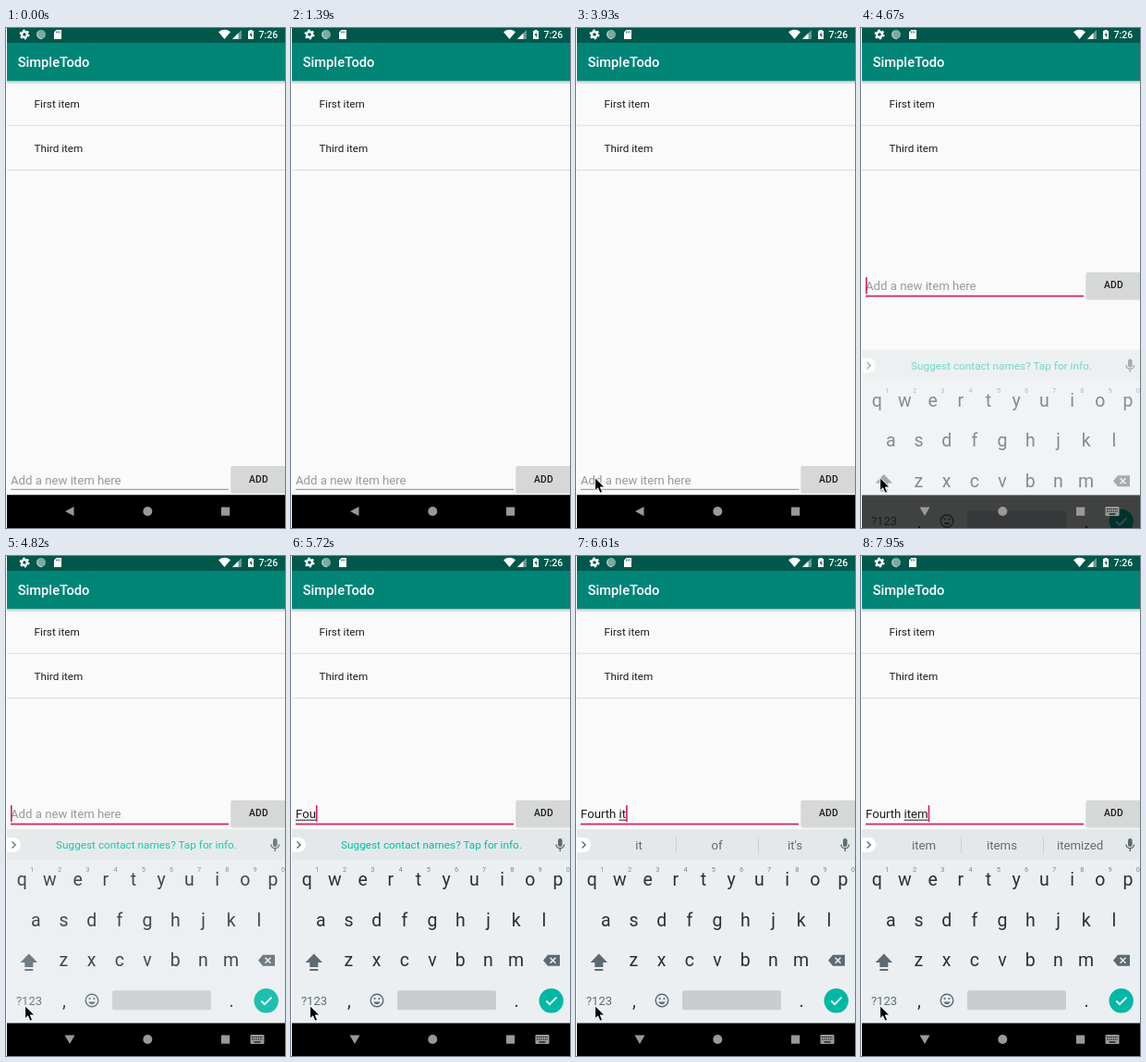
An HTML page that plays this animation: 302x540 px, repeating every 8 s.

```html
<!DOCTYPE html>
<html lang="en">
<head>
<meta charset="utf-8">
<title>Todo app</title>
<style>
  html, body { margin: 0; width: 100%; height: 100%; overflow: hidden; background: #fff; }
  svg { display: block; width: 100vw; height: 100vh; }
  text { font-family: Roboto, sans-serif; white-space: pre; }
  .mid { text-anchor: middle; }
  .key { font-size: 19.5px; fill: #263238; }
  .digit { font-size: 7.5px; fill: #78868d; }
  .word { font-size: 13.2px; fill: #5f6d74; }
  .field { font-size: 13.2px; }
  .icon { fill: #5c6b73; }
  .line { fill: none; stroke: #5c6b73; stroke-width: 1.4; }
</style>
</head>
<body>
<svg viewBox="0 0 302 540">
  <defs>
    <linearGradient id="shadow" x2="0" y2="1">
      <stop stop-color="#000" stop-opacity=".24"/>
      <stop offset="1" stop-color="#000" stop-opacity="0"/>
    </linearGradient>
  </defs>
  <rect x="1" width="301" height="540" fill="#fafafa"/>

  <!-- list and bars -->
  <rect x="1" y="57" width="301" height="4" fill="url(#shadow)"/>
  <rect x="1" width="301" height="57" fill="#008577"/>
  <rect x="1" width="301" height="16" fill="#00574b"/>
  <text x="12.7" y="42.3" font-size="14.7" font-weight="500" fill="#fff">SimpleTodo</text>
  <g font-size="11.7" fill="#1c1c1c">
    <text x="30.6" y="85.6">First item</text>
    <text x="30.6" y="133.8">Third item</text>
  </g>
  <path d="M1 105.2H302M1 153.5H302" stroke="#dadada"/>

  <!-- status icons -->
  <g fill="#fff">
    <circle cx="20" cy="7" r="3" fill="none" stroke="#fff" stroke-width="2.4"/>
    <circle cx="20" cy="7" r="4.7" fill="none" stroke="#fff" stroke-width="1.6" stroke-dasharray="2.4 2.52"/>
    <circle cx="38" cy="7" r="5" fill="#7fa8a1"/>
    <path d="M35 3.6A5 5 0 0 0 39 11.8" fill="none" stroke="#c3d6d2"/>
    <path d="M54.5 2H60V12H52V4.6Z"/>
    <path d="M54.5 3.5V5.5M56.3 3.5V5.5M58.1 3.5V5.5" stroke="#00574b" stroke-width=".8"/>
    <path d="M230 4.2Q236.5 -.6 243 4.2L236.5 12Z"/>
    <path d="M255 2V12H245Z" opacity=".4"/>
    <path d="M251.5 5.5V12H245Z"/>
    <path d="M263.5 2H266.500V3H268V12H262V3H263.500Z"/>
    <path d="M265.600 4.500L263.600 8H265V10.500L266.700 7H265.600Z" fill="#00574b"/>
    <text x="273.500" y="11" font-size="10.600" font-weight="500">7:26</text>
  </g>

  <!-- entry row -->
  <g id="row">
    <text id="entry" class="field" x="5" y="492.600"></text>
    <rect id="mark" y="494" height="1" fill="#222"/>
    <rect id="rule" x="5" width="236"/>
    <rect id="caret" y="478.500" width="1.600" height="18" fill="#d81b60"/>
    <rect x="243.500" y="474.500" width="60" height="28.500" rx="2" fill="#000" opacity=".13"/>
    <rect x="243.500" y="473" width="60" height="28.300" rx="1.500" fill="#d6d7d7"/>
    <text class="mid" x="273.500" y="490.800" font-size="10.300" font-weight="500" letter-spacing=".2" fill="#1c1c1c">ADD</text>
  </g>

  <rect x="1" y="504.500" width="301" height="36" fill="#000"/>

  <!-- keyboard -->
  <g id="board">
    <rect x="1" y="295" width="301" height="210" fill="#eceff1"/>
    <rect x="1" y="295" width="301" height="33" fill="#e4e8ea"/>
    <path d="M1 304H8A8 8 0 0 1 8 320H1Z" fill="#fff"/>
    <path d="M6.500 308.500L10.200 312L6.500 315.500" class="line"/>
    <rect class="icon" x="289" y="305" width="4.600" height="9" rx="2.300"/>
    <path class="line" stroke-width="1.200" d="M287 311.500A4.300 4.300 0 0 0 295.600 311.500M291.300 316V319"/>
    <text id="notice" x="54" y="316.200" font-size="11.800" fill="#00bfa5">Suggest contact names? Tap for info.</text>
    <g id="words">
      <path d="M108.500 303V321M197.500 303V321" stroke="#cbd0d3"/>
    </g>
    <path class="icon" d="M24.800 429.500L34 439H29.300V444H20.300V439H15.600ZM20.300 446H29.300V448H20.300Z"/>
    <path class="icon" d="M278 430.700H291V442.700H278L273 436.700Z"/>
    <path d="M280.500 433.700L286.500 439.700M286.500 433.700L280.500 439.700" stroke="#eceff1" stroke-width="1.500"/>
    <text class="mid icon" x="25" y="484.500" font-size="13">?123</text>
    <circle class="line" cx="93" cy="480" r="6.800"/>
    <circle class="icon" cx="90.600" cy="478" r="1.100"/>
    <circle class="icon" cx="95.400" cy="478" r="1.100"/>
    <path class="icon" d="M89.300 481.500H96.700A3.900 3.900 0 0 1 89.300 481.500Z"/>
    <rect x="115" y="469.300" width="107" height="21" rx="2" fill="#c9cdd0"/>
    <circle cx="281.700" cy="480.300" r="13.200" fill="#00b8a5"/>
    <path d="M276.300 480.500L280 484.200L287.500 476.700" fill="none" stroke="#fff" stroke-width="1.800"/>
  </g>

  <!-- navigation -->
  <rect id="shade" x="1" y="504.500" width="301" height="36"/>
  <g fill="#999">
    <path id="back" d="M64 522L73.500 517V527Z"/>
    <path id="down" d="M63.500 517.500H74.500L69 527Z"/>
    <circle cx="153.300" cy="522" r="5"/>
    <rect x="233" y="517.500" width="9.200" height="9.200"/>
    <g id="switch">
      <rect x="264.500" y="517" width="15" height="10" rx="1"/>
      <path d="M266 519.500H278M266 522H278" stroke="#000" stroke-width="1.200" stroke-dasharray="1.300 1"/>
      <path d="M268.500 525H275.500" stroke="#000" stroke-width="1.200"/>
    </g>
  </g>

  <path id="pointer" d="M.6 .8V14.700L3.700 11.800L6 17.200L8.600 16.100L6.300 10.900H10.900Z" fill="#000" stroke="#fff" stroke-width=".9"/>
</svg>

<script>
const LOOP = 8000;
const $ = id => document.getElementById(id);
const pen = document.createElement('canvas').getContext('2d');

// Each table row is a start time followed by the values that hold from then on.
const POINTER = [
  [0], [500, 242, 527], [650, 194, 496], [790, 187, 496], [1090, 180, 485],
  [1390], [3640, -8, 484], [3780, 15.5, 484], [3930, 20, 485]
];
const BOARD = [ // drop, opacity, navigation shade
  [0, 0, 0, 1], [4670, 52.5, .55, .5], [4820, 0, .88, 1], [4970, 0, 1, 1]
];
const TYPED = [ // text, start of the underlined part
  [0, '', 0], [5270, 'F', 0], [5570, 'Fo', 0], [5720, 'Fou', 0], [5870, 'Four', 0],
  [6010, 'Fourt', 0], [6310, 'Fourth ', 7], [6460, 'Fourth i', 7],
  [6610, 'Fourth it', 7], [6750, 'Fourth ite', 7], [7050, 'Fourth item', 7]
];
const WORDS = [
  [0], [5870, 'Your', 'For', 'Four'], [6010, 'Fourth', 'Forty', 'Fourteenth'],
  [6310, 'in', 'of', 'to'], [6460, 'i', 'of', 'in'], [6610, 'it', 'of', "it's"],
  [6750, 'ite', 'item', 'items'], [7050, 'item', 'items', 'itemized']
];
const CARET = [[0, 0], [4670, 1], [5120, 0], [5270, 1], [7500, 0], [7950, 1]];

const at = (table, t) => table.findLast(row => row[0] <= t).slice(1);
const show = (id, on) => $(id).setAttribute('display', on ? 'inline' : 'none');

function set(id, attrs) {
  for (const name in attrs) $(id).setAttribute(name, attrs[name]);
}

function label(parent, cls, x, y, str) {
  const el = document.createElementNS('http://www.w3.org/2000/svg', 'text');
  el.setAttribute('class', 'mid ' + cls);
  el.setAttribute('x', x);
  el.setAttribute('y', y);
  el.textContent = str;
  return $(parent).appendChild(el);
}

function width(str) {
  pen.font = '13.2px Roboto, sans-serif';
  return pen.measureText(str).width;
}

[['qwertyuiop', 17.2, 356], ['asdfghjkl', 32.3, 399.5], ['zxcvbnm', 62.4, 443]]
  .forEach(([keys, x, y]) =>
    [...keys].forEach((key, i) => label('board', 'key', x + i * 30.2, y, key)));
[...'1234567890'].forEach((n, i) => label('board', 'digit', 28 + i * 30.2, 341, n));
label('board', 'key', 63, 487, ',');
label('board', 'key', 244, 487, '.');
const slots = [68, 152.5, 237].map(x => label('words', 'word', x, 316.7, ''));

function draw(t) {
  const open = t >= 4670;
  const [px, py] = at(POINTER, t);
  show('pointer', px !== undefined);
  if (px !== undefined) set('pointer', { transform: `translate(${px} ${py})` });

  const [drop, alpha, shade] = at(BOARD, t);
  set('board', { transform: `translate(0 ${drop})`, opacity: alpha });
  set('shade', { opacity: shade });
  ['board', 'down', 'switch'].forEach(id => show(id, open));
  show('back', !open);

  const [text, from] = at(TYPED, t);
  const end = 5 + width(text);
  const start = 5 + width(text.slice(0, from));
  set('row', { transform: `translate(0 ${open ? -209.3 : 0})` });
  set('rule', open ? { y: 498, height: 1.7, fill: '#d81b60' } : { y: 497.8, height: 1, fill: '#8a8a8a' });
  set('entry', { fill: text ? '#1c1c1c' : '#999' });
  $('entry').textContent = text || 'Add a new item here';
  set('mark', { x: start, width: Math.max(0, end - start) });
  set('caret', { x: end });
  show('caret', at(CARET, t)[0]);

  const words = at(WORDS, t);
  show('notice', !words.length);
  show('words', words.length);
  slots.forEach((slot, i) => slot.textContent = words[i] || '');
}

const begin = performance.now();
function tick() {
  draw((performance.now() - begin) % LOOP);
  requestAnimationFrame(tick);
}
tick();
</script>
</body>
</html>
```
